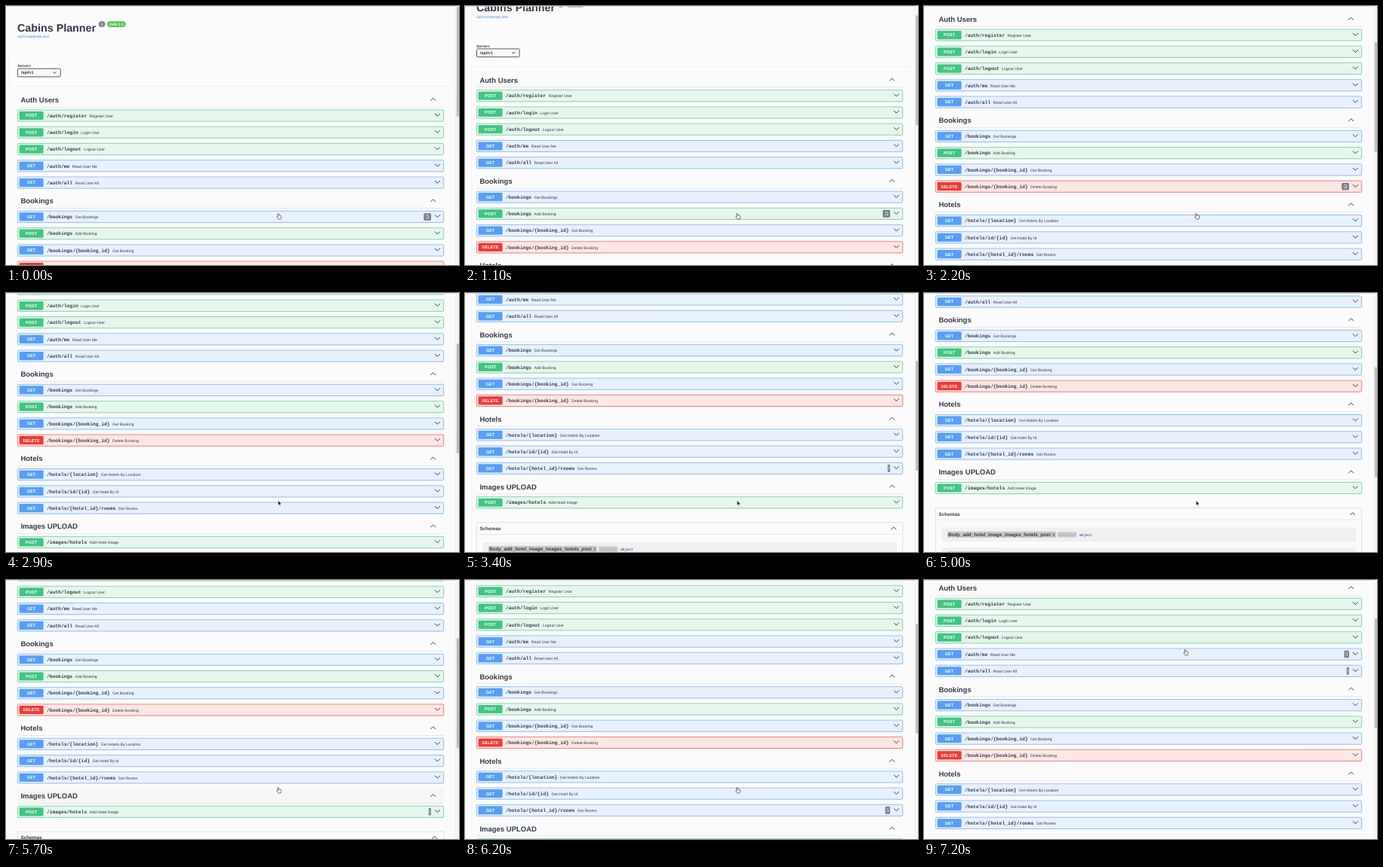
An HTML page for the animation above (7.3 s loop, 600 by 344 pixels).

```html
<!DOCTYPE html>
<html lang="en">
<head>
<meta charset="utf-8">
<title>API docs</title>
<style>
  html, body { margin: 0; width: 100%; height: 100%; overflow: hidden; background: #fbfbfb; }
  svg { display: block; width: 600px; height: 344px; }
  text { font-family: "Liberation Sans", Arial, sans-serif; fill: #343a46; text-rendering: geometricPrecision; white-space: pre; }
  .b { font-weight: 700; }
  .mono { font-family: "Liberation Mono", "Courier New", monospace; font-weight: 700; }
  .mid { text-anchor: middle; }
  .line { fill: none; stroke: #30343c; stroke-width: .95; stroke-linecap: round; stroke-linejoin: round; }
</style>
</head>
<body>
<svg id="stage" viewBox="0 0 600 344">
  <g id="page"></g>
  <rect width="600" height=".8" fill="#d6d6d6"/>
  <rect x="595.8" width="4.2" height="344" fill="#f5f5f5"/>
  <rect x="595.6" width=".4" height="344" fill="#e6e6e6"/>
  <rect id="thumb" x="596.8" width="3.2" height="146" rx="1.4" fill="#bebebe"/>
  <g id="cursor" stroke-linejoin="round">
    <path id="arrow" d="M0 0V6.2L1.5 4.9L2.5 7L3.5 6.5L2.6 4.5L4.5 4.4Z" fill="#111" stroke="#fff" stroke-width=".5"/>
    <path id="hand" d="M-.6 .2Q0 -.5 .6 .2L1 2.3Q2.8 2 4 3L4.2 5L3.3 7.2H.4L-1.8 4.4Q-1.6 3.4 -.2 4Z" fill="#fff" stroke="#222" stroke-width=".65"/>
  </g>
</svg>
<script>
const NS = "http://www.w3.org/2000/svg";
const $ = id => document.getElementById(id);
const page = $("page");

function add(tag, attrs, parent = page) {
  const el = document.createElementNS(NS, tag);
  for (const k in attrs) el.setAttribute(k, attrs[k]);
  parent.append(el);
  return el;
}
const box = (x, y, width, height, fill, rx = 0, more = {}) =>
  add("rect", { x, y, width, height, fill, rx, ...more });

// Text is placed by the middle of its capitals.
function label(str, x, y, size, cls = "", fill) {
  const el = add("text", { x, y: y + size * .35, "font-size": size, class: cls });
  el.textContent = str;
  if (fill) el.style.fill = fill;
  return el;
}
const chevron = (x, y, dir, w = 3.1) =>
  add("path", { class: "line", d: `M${x - w} ${y - dir * w / 2}L${x} ${y + dir * w / 2}L${x + w} ${y - dir * w / 2}` });

const KINDS = {
  POST: ["#40c583", "#e6f6ec"],
  GET: ["#559ff6", "#e8f1fb"],
  DELETE: ["#f03a36", "#fce7e4"]
};
const SECTIONS = [
  ["Auth Users",
    ["POST", "/auth/register", "Register User"],
    ["POST", "/auth/login", "Login User"],
    ["POST", "/auth/logout", "Logout User"],
    ["GET", "/auth/me", "Read User Me"],
    ["GET", "/auth/all", "Read User All"]],
  ["Bookings",
    ["GET", "/bookings", "Get Bookings"],
    ["POST", "/bookings", "Add Booking"],
    ["GET", "/bookings/{booking_id}", "Get Booking"],
    ["DELETE", "/bookings/{booking_id}", "Delete Booking"]],
  ["Hotels",
    ["GET", "/hotels/{location}", "Get Hotels By Location"],
    ["GET", "/hotels/id/{id}", "Get Hotel By Id"],
    ["GET", "/hotels/{hotel_id}/rooms", "Get Rooms"]],
  ["Images UPLOAD",
    ["POST", "/images/hotels", "Add Hotel Image"]]
];
const targets = [];

function header() {
  label("Cabins Planner", 15, 28.6, 14.3, "b");
  box(122.6, 20.2, 8.8, 7.8, "#7d8492", 3.9);
  label("1", 127, 24.1, 4.6, "b mid", "#fff");
  box(134, 20.2, 24.6, 7.8, "#55c94e", 3.9);
  label("OAS 3.1", 146.3, 24.1, 4.9, "b mid", "#fff");
  label("/api/v1/openapi.json", 15, 40.5, 4.78, "", "#3f82e4");
  box(3.6, 66, 588.6, 41, "#f1f1f1", 1);
  box(4.2, 66.4, 587.4, 39.8, "#fcfcfc", 1);
  label("Servers", 15.3, 79.2, 4.77, "b");
  box(15.4, 83.2, 56.8, 10.8, "#f8f8f8", 1.6, { stroke: "#41444e", "stroke-width": .9 });
  label("/api/v1", 20, 88.5, 5.4, "b");
  chevron(64.3, 88.6, 1, 1.8);
}

function heading(name, y) {
  const glow = box(15, y - 9.4, 565, 18.8, "#000", 0, { opacity: 0 });
  label(name, 19.4, y, 9.5, "b");
  box(15, y + 9.3, 565, .5, "#d3d5d9");
  chevron(565.7, y - .7, -1);
  targets.push({ y, half: 9.4, show: w => glow.setAttribute("opacity", w ? .02 : 0) });
}

function row([method, path, summary], y) {
  const [color, tint] = KINDS[method];
  box(15, y - 7.5, 565, 15.7, "#000", 1.8, { opacity: .07 });
  box(15.3, y - 7.6, 564.4, 15.2, tint, 1.6, { stroke: color, "stroke-width": .6 });
  box(17.6, y - 5.6, 32, 11.2, color, 1.3);
  label(method, 33.5, y, 5.56, "b mid", "#fff");
  const text = label(path, 53.9, y, 6.35, "mono");
  const note = add("tspan", { dx: 3.4, "font-size": 5.15 }, text);
  note.textContent = summary;
  note.style.cssText = 'font-family:"Liberation Sans",Arial,sans-serif;font-weight:400';
  chevron(571.4, y - .7, 1);

  const icon = add("g", {});
  add("rect", { x: -9.6, y: -4.8, width: 9.6, height: 9.6, rx: 1.5, fill: "#737985" }, icon);
  add("path", { d: "M-6.6 -2.3H-3V2.3H-6.6ZM-5.6 -2.6H-4M-4.8 .2H-2.4M-4.8 1.1H-3.2", fill: "none", stroke: "#eef0f2", "stroke-width": .6 }, icon);
  targets.push({
    y, half: 7.9,
    show: w => icon.setAttribute("transform", `translate(563 ${y}) scale(${w} 1)`)
  });
}

function model(name, y) {
  box(24, y - 9.2, 548, 18.4, "#f0f0f0", 1.5);
  const back = box(31.2, y - 4.2, 10, 8, "#c6c6c6");
  const text = label(name, 32, y, 6.35, "b");
  const end = 32 + text.getComputedTextLength();
  back.setAttribute("width", end + 7 - 31.2);
  add("path", { class: "line", d: `M${end + 3.2} ${y - 1.7}l1.7 1.7l-1.7 1.7` });
  box(end + 9.5, y - 3.6, 25, 7, "#c9c9c9");
  label("Expand all", end + 10.2, y, 4.78, "", "#b2b2b2");
  label("object", end + 38, y + .3, 4.76, "mono", "#3c5fa8");
}

function build() {
  header();
  let y = 124.6;
  for (const [name, ...rows] of SECTIONS) {
    heading(name, y);
    y += 20.95;
    for (const r of rows) { row(r, y); y += 22.25; }
    y += 2.2;
  }
  box(15.3, 508.4, 564.4, 300, "none", 1.6, { stroke: "#cfd1d4", "stroke-width": .6 });
  box(15.3, 523.8, 564.4, .5, "#d3d5d9");
  label("Schemas", 19.6, 516.3, 6.35, "b");
  chevron(567.7, 516.2, -1);
  model("Body_add_hotel_image_images_hotels_post", 544);
  model("HTTPValidationError", 570.5);
}

// Key points: time in ms, then values.
const SCROLL = [
  [0, 0], [300, 8], [500, 18.5], [800, 23.5], [1100, 26.3], [1300, 39], [1500, 58], [1700, 67],
  [1900, 77], [2200, 107], [2400, 124.5], [2600, 129.5], [2900, 151], [3100, 170], [3500, 215],
  [3700, 220.4], [3900, 220.4], [4000, 220.8], [4400, 230], [4700, 236], [4900, 236], [5000, 223],
  [5200, 204], [5300, 196], [5700, 174.2], [6300, 122], [6500, 114.3], [6600, 113.8]
];
const MOUSE_X = [[6600, 360.4], [7100, 345.6]];
const MOUSE_Y = [[6600, 275.8], [6700, 262], [7000, 122], [7100, 92.6]];

function at(keys, t) {
  if (t <= keys[0][0]) return keys[0][1];
  const i = keys.findIndex(k => k[0] >= t);
  if (i < 0) return keys[keys.length - 1][1];
  const [t0, a] = keys[i - 1], [t1, b] = keys[i];
  return a + (b - a) * (t - t0) / (t1 - t0);
}

const STEP = 100, LOOP = 7300, LAG = 300;

// Hover follows scrolling with a delay, the pointer at once.
const hits = (target, t) =>
  Math.abs(at(MOUSE_Y, t) + at(SCROLL, t - LAG) - target.y) < target.half;

function draw(now) {
  const t = Math.floor(now % LOOP / STEP) * STEP;
  const s = at(SCROLL, t);
  page.setAttribute("transform", `translate(0 ${-s})`);
  $("thumb").setAttribute("y", 1 + s * .437);
  let over = false;
  for (const target of targets) {
    const seen = [0, 1, 2].filter(i => hits(target, t - i * STEP)).length;
    target.show(seen / 3);
    over = over || hits(target, t);
  }
  $("cursor").setAttribute("transform", `translate(${at(MOUSE_X, t)} ${at(MOUSE_Y, t)})`);
  $("hand").style.display = over ? "" : "none";
  $("arrow").style.display = over ? "none" : "";
}

build();
const start = performance.now();
function tick() {
  draw(performance.now() - start);
  requestAnimationFrame(tick);
}
tick();
</script>
</body>
</html>
```
